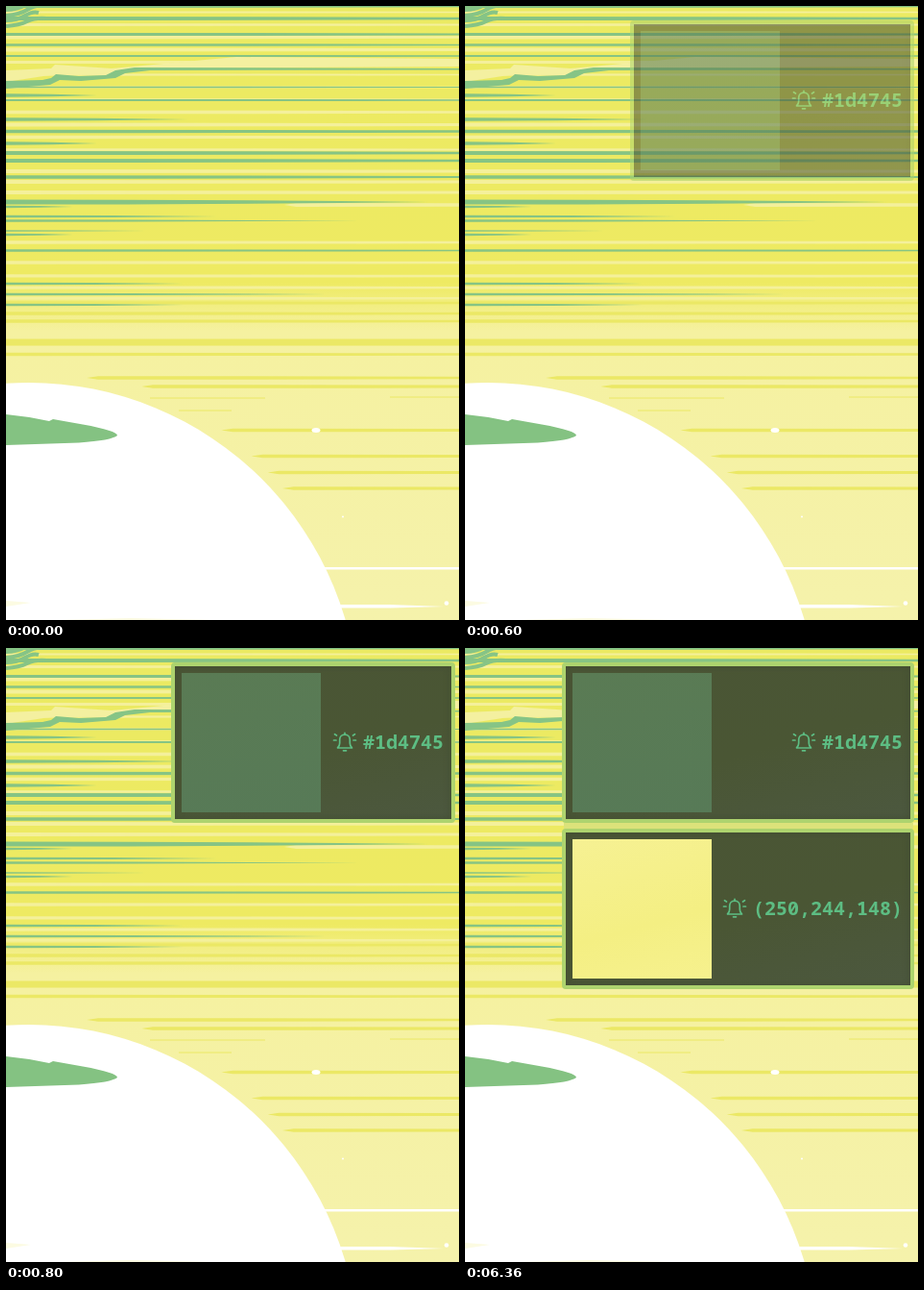
An HTML page that plays this animation: 472 px wide and 639 px high, repeating every 8000 ms.

```html
<!DOCTYPE html>
<html lang="en">
<head>
<meta charset="utf-8">
<title>Colour notifications</title>
<style>
  html, body { margin: 0; width: 100%; height: 100%; overflow: hidden; }
  body { position: relative; background: #f5f2a8; }
  #sky { position: absolute; left: 0; top: 0; width: 472px; height: 639px; }

  .note {
    position: absolute; box-sizing: border-box; height: 167px;
    border: 4px solid #add36e; border-radius: 4px;
    background: linear-gradient(165deg, #4a5535, #4a5634 55%, #4c583f);
    box-shadow: inset 0 0 7px #414b30;
    color: #5dbd83; opacity: 0;
  }
  .first { left: 172px; top: 15px; width: 296px; animation: fade 8s step-end infinite, widen 8s step-end infinite; }
  .second { left: 101px; top: 188px; width: 367px; animation: show 8s step-end infinite; }
  .gap {
    position: absolute; left: 103px; top: 182px; width: 364px; height: 6px;
    background: #dce27a; opacity: 0; animation: show 8s step-end infinite;
  }
  .swatch { position: absolute; left: 7px; top: 7px; width: 145px; height: 145px; }
  .first .swatch { background: linear-gradient(170deg, #5a7b54, #577a57); }
  .second .swatch { background: linear-gradient(165deg, #f6f193, #f4ef83 60%, #f6f18e); }
  .label {
    position: absolute; right: 8px; top: 66px; display: flex; align-items: center; height: 26px;
    font: 600 20px/26px "Noto Sans Mono", "DejaVu Sans Mono", monospace; white-space: pre;
  }
  .label svg { width: 26px; height: 26px; margin-right: 6px; }

  @keyframes fade {
    0% { opacity: 0; }
    6.25% { opacity: .13; }
    7.5% { opacity: .57; }
    8.75% { opacity: .98; }
    10%, 100% { opacity: 1; }
  }
  @keyframes widen {
    0% { left: 172px; width: 296px; }
    48.75%, 100% { left: 101px; width: 367px; }
  }
  @keyframes show {
    0% { opacity: 0; }
    48.75%, 100% { opacity: 1; }
  }
</style>
</head>
<body>
<svg id="sky" viewBox="0 0 472 639">
  <defs>
    <linearGradient id="base" x1="0" y1="0" x2="0" y2="1">
      <stop offset="0" stop-color="#ebea62"/>
      <stop offset=".45" stop-color="#eeea62"/>
      <stop offset=".49" stop-color="#f2ee84"/>
      <stop offset=".53" stop-color="#f5f1a0"/>
      <stop offset="1" stop-color="#f5f2ab"/>
    </linearGradient>
  </defs>
  <rect width="472" height="639" fill="url(#base)"/>
  <g id="streaks"></g>
  <g fill="none" stroke="#ebe865">
    <path stroke-width="7" d="M0 350H472"/>
    <path d="M150 408H270M400 407H472M180 421H235"/>
  </g>

  <!-- ragged cloud edge -->
  <path fill="#f4f0a0" d="M0 67L47 65 51 61 110 65 240 53 472 55V63L134 65 106 72 52 71 0 79Z"/>
  <path fill="#86c486" d="M0 78L38 77 47 75 52 71 76 73 104 72 114 67 134 64 472 65V66.500L150 67 124 70 114 75 78 78 56 77 46 82 0 86Z"/>
  <g fill="none" stroke="#86c486" stroke-width="4">
    <path d="M0 4Q12 4 22-2M0 10Q14 9 22 4T38 0"/>
    <path d="M0 15Q12 15 20 10T34 7"/>
    <path d="M0 21Q14 20 22 16T42 13"/>
  </g>

  <circle cx="24" cy="735.500" r="343.500" fill="#fff"/>
  <path fill="#84c282" d="M0 425Q22 427 45 432L49 430 80 435.500Q116 442 116 447 110 452 76 454.500L0 457Z"/>
  <path fill="#fcfbe2" d="M0 619L26 621 0 625ZM58 639L130 637 214 639Z"/>
  <g fill="#fff">
    <ellipse cx="323" cy="441.500" rx="4.500" ry="2.500"/>
    <path d="M328 584H472V586.500H328ZM348 623H400L456 625 400 626.500H348Z"/>
    <circle cx="459" cy="621.500" r="2.300"/>
    <circle cx="351" cy="531.500" r="1"/>
  </g>
</svg>

<div class="gap"></div>
<div class="note first"><div class="swatch"></div><div class="label"><svg viewBox="0 0 26 26"><use href="#bell"/></svg>#1d4745</div></div>
<div class="note second"><div class="swatch"></div><div class="label"><svg viewBox="0 0 26 26"><use href="#bell"/></svg>(250,244,148)</div></div>

<svg width="0" height="0" style="position:absolute">
  <g id="bell" fill="none" stroke="currentColor" stroke-width="1.700" stroke-linecap="round" stroke-linejoin="round">
    <path d="M5.500 19H20.500Q18.300 17 18.300 14V10.500C18.300 7 16 5.200 13 5.200S7.700 7 7.700 10.500V14Q7.700 17 5.500 19Z"/>
    <path d="M13 3.300V5M11.500 21.800H14.500M4.500 6L2.500 4.700M21.500 6L23.500 4.700M4 11H1.500M22 11H24.500"/>
  </g>
</svg>

<script>
  const rows = (n, draw) => Array.from({ length: n }, (_, i) => draw(i)).join("");

  // A brush stroke: quick swell at x0, long taper to a point at x1.
  function streak(y, h, x1 = 900, x0 = -20) {
    const r = h / 2, a = x0 + 12, mid = (a + x1) / 2;
    return `M${x0} ${y}L${a} ${y - r}Q${mid} ${y - r} ${x1} ${y}Q${mid} ${y + r} ${a} ${y + r}Z`;
  }

  function paint(fill, ...parts) {
    const path = document.createElementNS("http://www.w3.org/2000/svg", "path");
    path.setAttribute("fill", fill);
    path.setAttribute("d", parts.join(""));
    document.getElementById("streaks").append(path);
  }

  paint("#f4f09b",
    rows(12, i => streak(6.5 + 13 * i, 3 - Math.cos(i + 0.5))),
    rows(3, i => streak(172 + 11 * i, 4)),
    rows(5, i => streak(246 + 21 * i ** 0.735, 3.3)),
    streak(207, 4, 900, 290));

  // Lower streaks start further right, following the curve below them.
  const onset = y => y < 387 ? -20 : 84 + 19 * Math.sqrt(y - 387);
  paint("#ebe865",
    [309, 320, 328, 362.5, 387, 396, 441.5, 468.5, 485.5, 502]
      .map(y => streak(y, 3.5, 900, onset(y))).join(""));

  paint("#86c484",
    [0, 13, 29.5, 40.5, 52, 84.5, 98, 130.5, 153, 161, 178, 254.5]
      .map(y => streak(y, 2.8 + 1.2 * Math.cos(y / 24), 800)).join(""),
    rows(3, i => streak(93 + 25 * i, 3.5, 95 + 95 * (i % 2))),
    rows(3, i => streak(204 + 15 * i, 5 / (i + 1), 440 / (i + 1))),
    rows(3, i => streak(209 + 14.5 * i, 2.3, 70 + 298 * (i % 2))),
    rows(3, i => streak(289 + 11 * i, 2.6, 335 - 150 * (i - 1) ** 2)));
</script>
</body>
</html>
```
